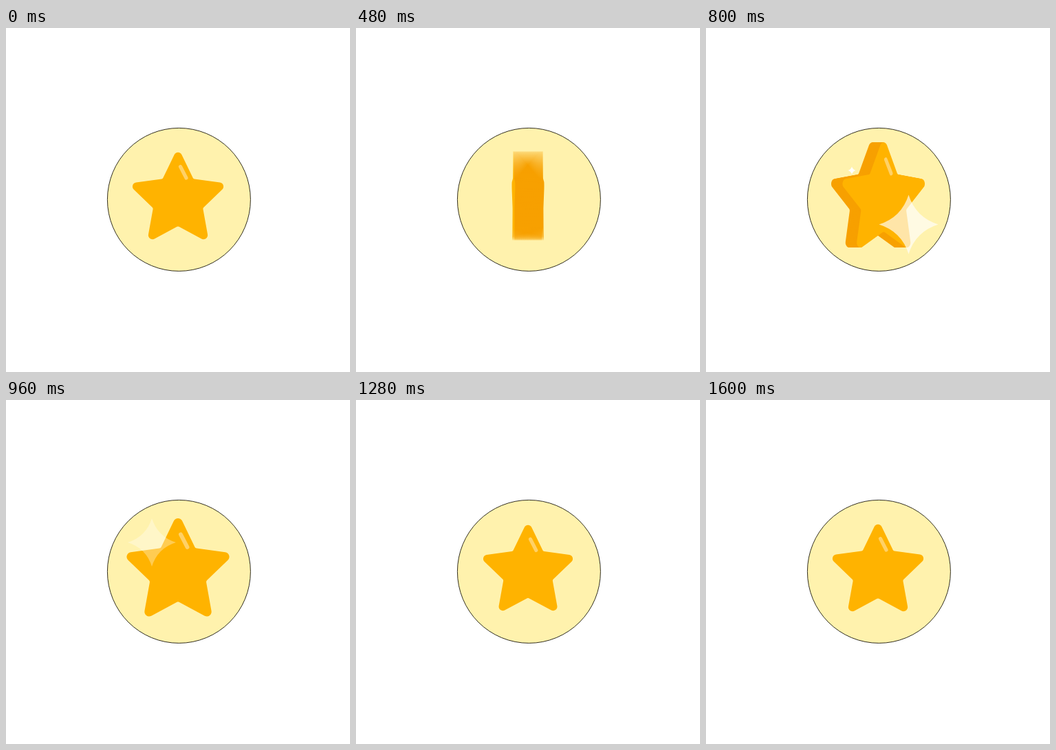
These frames come from a looping animation (500x500 px, 2.32 s). An HTML page with a canvas:

```html
<!DOCTYPE html>
<html lang="en">
<head>
<meta charset="utf-8">
<title>Spinning star</title>
<style>
  html, body { margin: 0; width: 100%; height: 100%; overflow: hidden; background: #fff; }
  canvas { display: block; width: 500px; height: 500px; }
</style>
</head>
<body>
<canvas id="stage" width="500" height="500"></canvas>
<script>
const ctx = document.getElementById('stage').getContext('2d');
const LOOP = 2320, STEP = 80, CENTER = 250;
const FACE = '#ffb300', SIDE = '#f7a000';

const clamp = v => Math.min(1, Math.max(0, v));

// Sine ease-in-out from 0 to 1 between two times
const ease = (t, from, to) => (1 - Math.cos(Math.PI * clamp((t - from) / (to - from)))) / 2;

// Dip, swell, dip again, settle
const scaleAt = t => 1
  - 0.049 * ease(t, 80, 320)
  + 0.262 * ease(t, 320, 760)
  - 0.229 * ease(t, 760, 1240)
  + 0.016 * ease(t, 1240, 1600);

// One turn that overshoots and swings back, in degrees
const angleAt = t => 404 * ease(t, 320, 825) - 44 * ease(t, 825, 960);

const depthAt = t => 41 * clamp(Math.min((t - 320) / 160, (960 - t) / 320));

const sparkles = [
  { x: 294.5, y: 285.5, start: 640, size: 43, fade: 0.6 },
  { x: 212, y: 207, start: 800, size: 35, fade: 1.64 }
];

function roundedStar(outer, inner, tipRadius, dentRadius) {
  const points = Array.from({ length: 10 }, (_, i) => {
    const a = i * Math.PI / 5, r = i % 2 ? inner : outer;
    return [r * Math.sin(a), -r * Math.cos(a)];
  });
  const path = new Path2D();
  const last = points[9];
  path.moveTo((last[0] + points[0][0]) / 2, (last[1] + points[0][1]) / 2);
  points.forEach((p, i) => {
    const next = points[(i + 1) % 10];
    path.arcTo(...p, ...next, i % 2 ? dentRadius : tipRadius);
  });
  path.closePath();
  return path;
}

const star = roundedStar(77, 38, 6, 3);

function drawDisc() {
  ctx.beginPath();
  ctx.arc(251.4, 249.4, 104, 0, Math.PI * 2);
  ctx.fillStyle = '#fff2ad';
  ctx.fill();
  ctx.lineWidth = 0.9;
  ctx.strokeStyle = '#1a180c';
  ctx.stroke();
}

function drawStar(t) {
  const s = scaleAt(t);
  const angle = angleAt(t) * Math.PI / 180;
  const cos = Math.cos(angle);
  const half = depthAt(t) * Math.sin(angle) * s / 2;
  const near = cos < 0 ? -half : half;

  const place = (dx, paint) => {
    ctx.save();
    ctx.translate(CENTER + dx, CENTER);
    ctx.scale(s * cos, s);
    paint();
    ctx.restore();
  };

  // Extrusion from the far face to the near one
  const slices = Math.ceil(Math.abs(near) * 2);
  ctx.fillStyle = SIDE;
  for (let i = 0; i < slices; i++) {
    place(near * (2 * i / slices - 1), () => ctx.fill(star));
  }

  place(near, () => {
    ctx.fillStyle = FACE;
    ctx.fill(star);
    if (cos < 0) return;
    ctx.beginPath();
    ctx.moveTo(3.5, -48.5);
    ctx.lineTo(12, -32);
    ctx.lineWidth = 5.2;
    ctx.lineCap = 'round';
    ctx.strokeStyle = 'rgba(255, 255, 255, 0.4)';
    ctx.stroke();
  });
}

function drawSparkle({ x, y, start, size, fade }, t) {
  const age = (t - start) / 320;
  if (age < 0 || age >= 1) return;
  const r = size * (0.16 + 1.68 * age);
  const opacity = (1 - age) ** fade;
  ctx.save();
  ctx.translate(x, y);
  ctx.scale(r, r);
  ctx.beginPath();
  ctx.moveTo(0, -1);
  for (let i = 0; i < 4; i++) {
    ctx.quadraticCurveTo(0.24, -0.24, 1, 0);
    ctx.rotate(Math.PI / 2);
  }
  ctx.fillStyle = `rgba(255, 255, 255, ${opacity})`;
  ctx.fill();
  ctx.restore();
}

function render(now) {
  const t = Math.floor((now % LOOP) / STEP) * STEP;
  ctx.fillStyle = '#fff';
  ctx.fillRect(0, 0, 500, 500);
  drawDisc();
  drawStar(t);
  sparkles.forEach(sparkle => drawSparkle(sparkle, t));
}

const begin = performance.now();
function tick() {
  render(performance.now() - begin);
  requestAnimationFrame(tick);
}
tick();
</script>
</body>
</html>
```
